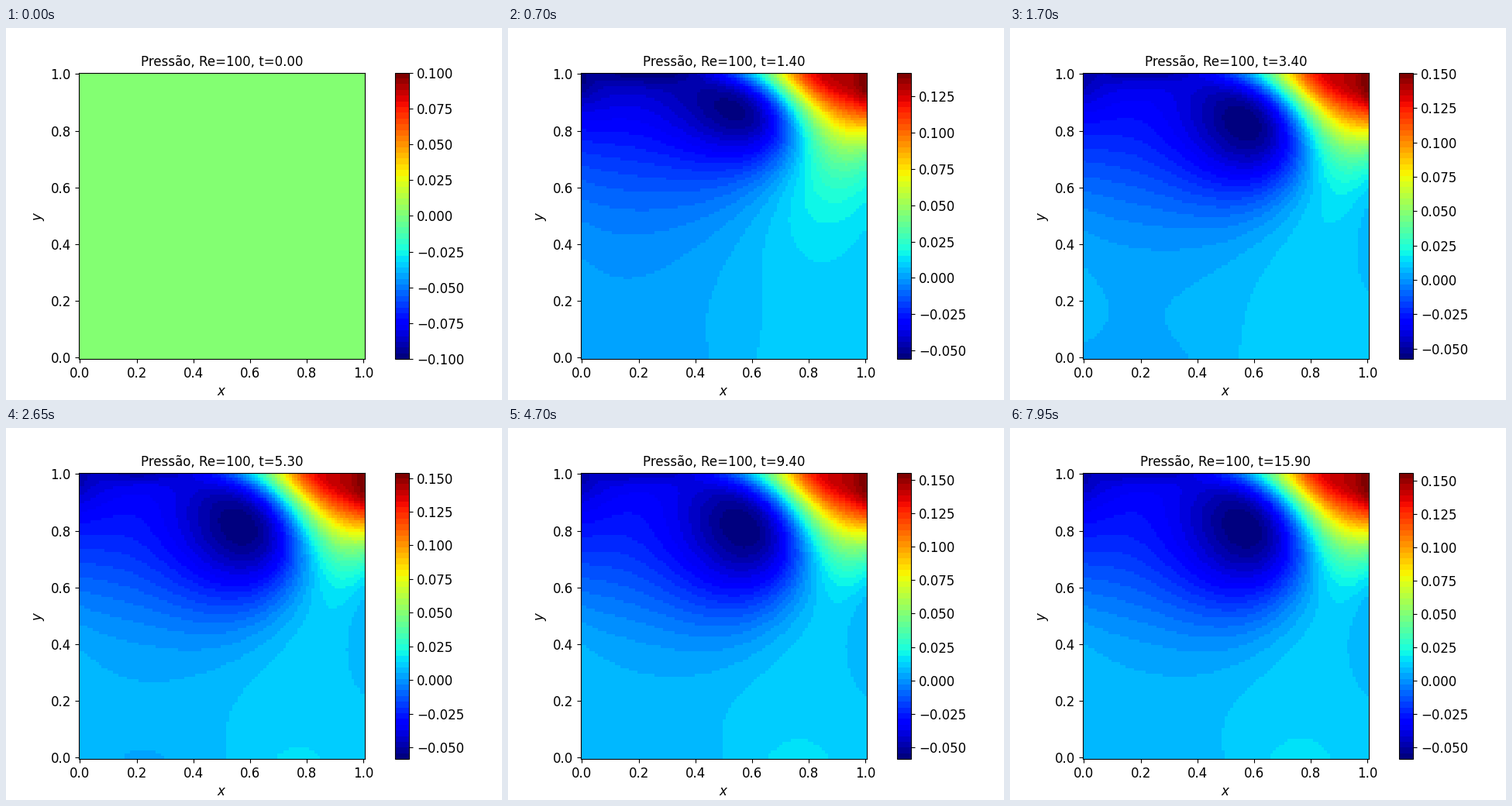
A matplotlib script for the animation above (8000 ms loop, 640 px wide and 480 px high).

```python
import numpy as np
import matplotlib.pyplot as plt
from matplotlib.animation import FuncAnimation

RE = 100
N = 64                    # pressure cells per side
H = 1 / N
DT = 0.005
STEPS = 20                # solver steps per frame
FRAMES = 160
NODES = np.linspace(0, 1, 101)


def lid_speed(x):
    return np.sin(np.pi * x)**2


def poisson_solver():
    """Neumann Poisson solver in the cosine basis, zero mean."""
    k = np.arange(N)
    basis = np.cos(np.pi * np.outer(k, k + 0.5) / N) * np.sqrt(2 / N)
    basis[0] /= np.sqrt(2)
    lam = (2 * np.cos(np.pi * k / N) - 2) / H**2
    inv = lam[:, None] + lam[None, :]
    inv[0, 0] = 1
    inv = 1 / inv
    inv[0, 0] = 0
    return lambda f: basis.T @ ((basis @ f @ basis.T) * inv) @ basis


def laplacian(a):
    mid = a[1:-1, 1:-1]
    return (a[1:-1, 2:] + a[1:-1, :-2] + a[2:, 1:-1] + a[:-2, 1:-1] - 4 * mid) / H**2


def cavity():
    """Pressure at the grid nodes for every frame of the lid-driven flow."""
    solve = poisson_solver()
    lid = lid_speed(np.linspace(0, 1, N + 1))
    centers = (np.arange(-1, N + 1) + 0.5) * H
    weights = np.array([np.interp(NODES, centers, row) for row in np.eye(N + 2)]).T

    u = np.zeros((N, N + 1))
    v = np.zeros((N + 1, N))
    up = np.zeros((N + 2, N + 1))
    vp = np.zeros((N + 1, N + 2))
    fields = [np.zeros((NODES.size, NODES.size))]
    for step in range(1, STEPS * (FRAMES - 1) + 1):
        up[1:-1], up[0], up[-1] = u, -u[0], 2 * lid - u[-1]
        vp[:, 1:-1], vp[:, 0], vp[:, -1] = v, -v[:, 0], -v[:, -1]
        uc = (u[:, 1:] + u[:, :-1]) / 2
        vc = (v[1:] + v[:-1]) / 2
        uv = (up[1:] + up[:-1]) * (vp[:, 1:] + vp[:, :-1]) / 4
        du = (-np.diff(uc**2, axis=1) - np.diff(uv, axis=0)[:, 1:-1]) / H
        dv = (-np.diff(vc**2, axis=0) - np.diff(uv, axis=1)[1:-1]) / H
        u[:, 1:-1] += DT * (du + laplacian(up) / RE)
        v[1:-1] += DT * (dv + laplacian(vp) / RE)
        div = (np.diff(u, axis=1) + np.diff(v, axis=0)) / H
        p = solve(div / DT)
        u[:, 1:-1] -= DT * np.diff(p, axis=1) / H
        v[1:-1] -= DT * np.diff(p, axis=0) / H
        if step % STEPS == 0:
            fields.append(weights @ np.pad(p, 1, mode="edge") @ weights.T)
    return fields


fields = cavity()

plt.rcParams.update({"font.family": "DejaVu Sans", "font.size": 12})
fig, ax = plt.subplots(figsize=(6.4, 4.8), dpi=100)
image = ax.imshow(fields[0], cmap=plt.get_cmap("jet", 50), origin="lower",
                  extent=(-0.005, 1.005, -0.005, 1.005),
                  interpolation="nearest", vmin=-0.1, vmax=0.1)
fig.colorbar(image, ax=ax)
ax.set_anchor("C")
ax.set_xlabel("$x$")
ax.set_ylabel("$y$")
title = ax.set_title("", fontsize=12)


def draw(i):
    p = fields[i]
    image.set_data(p)
    if i == 0:
        image.set_clim(-0.1, 0.1)
    else:
        image.set_clim(p.min(), p.max())
    title.set_text(f"Pressão, Re={RE}, t={i * 0.1:.2f}")
    return image, title


anim = FuncAnimation(fig, draw, frames=FRAMES, interval=50, repeat=True,
                     repeat_delay=0, blit=False)
plt.show()
```
